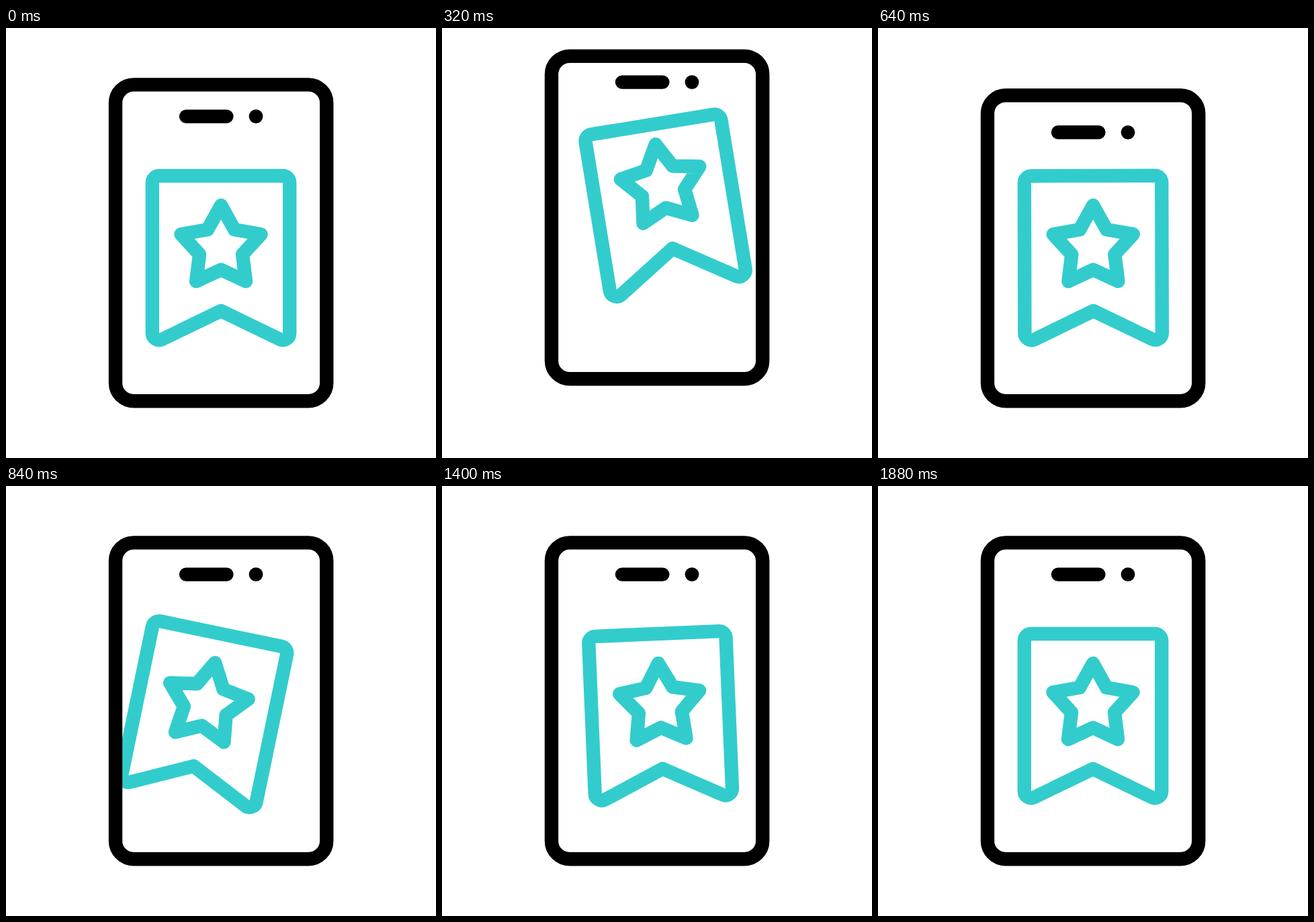
Write an HTML page that moves like this. It is 640 px wide and 640 px high and loops after 2 s.

```html
<!DOCTYPE html>
<html lang="en">
<head>
<meta charset="utf-8">
<title>Bookmark on a phone</title>
<style>
  html, body { margin: 0; width: 100%; height: 100%; overflow: hidden; background: #fff; }
  svg { display: block; width: 100vw; height: 100vh; }
  .line { fill: none; stroke-width: 20.4; stroke-linecap: round; stroke-linejoin: round; }
</style>
</head>
<body>
<svg viewBox="0 0 640 640">
  <g id="jump">
    <g id="swing" class="line" stroke="#33cccc">
      <path id="ribbon"/>
      <path id="star" d="M320 264 L340 300 L379.5 307 L352 337 L357 377 L320 359.7
        L283 377 L288 337 L260.5 307 L300 300 Z"/>
    </g>
    <rect id="body" class="line" stroke="#000" x="163" width="314.2" rx="27"/>
    <g id="speaker">
      <path class="line" stroke="#000" d="M268 131.6 H328.4"/>
      <circle cx="372" cy="131.6" r="10.4"/>
    </g>
  </g>
</svg>
<script>
const LOOP = 2000, STEP = 40;
const BODY_TOP = 84.4, BODY_BOTTOM = 555.2;
const $ = id => document.getElementById(id);

// Each track: [time in ms, value], eased between neighbours.
const tracks = {
  lift:    [[80, 0], [320, -33], [560, 0]],
  top:     [[80, 0], [320, -9.5], [560, 28], [735, 0]],
  speaker: [[80, 0], [320, -18], [560, 42], [735, 0]],
  ribbon:  [[80, 0], [320, -44], [560, 0]],
  star:    [[80, 0], [320, -58], [560, 0]],
  angle:   [[50, 0], [440, -12], [840, 11.7], [1312, -3.1], [1680, 1.7], [1880, 0]]
};

const ease = x => x * x * (3 - 2 * x);

function valueAt(keys, t) {
  if (t <= keys[0][0]) return keys[0][1];
  for (let i = 1; i < keys.length; i++) {
    const [t0, a] = keys[i - 1], [t1, b] = keys[i];
    if (t < t1) return a + (b - a) * ease((t - t0) / (t1 - t0));
  }
  return keys[keys.length - 1][1];
}

// Flag outline with rounded corners; its lower edges stay tangent to the corners.
function ribbonPath(corner, notch) {
  const r = 10.2, left = 228, right = 412;
  const head = 230.2 + corner, foot = 454.2 + corner, tip = 421 + notch;
  const dx = 320 - left, dy = tip - foot;
  const slope = Math.atan2(dy, dx) - Math.asin(r / Math.hypot(dx, dy));
  const sx = -r * Math.sin(slope), sy = foot + r * Math.cos(slope);
  const arc = (x, y) => `A${r} ${r} 0 0 1 ${x} ${y}`;
  return `M${left} ${head - r} H${right} ${arc(right + r, head)} V${foot}
    ${arc(right - sx, sy)} L320 ${tip} L${left + sx} ${sy}
    ${arc(left - r, foot)} V${head} ${arc(left, head - r)} Z`;
}

const move = (id, y) => $(id).setAttribute("transform", `translate(0 ${y})`);

function draw(t) {
  const v = {};
  for (const name in tracks) v[name] = valueAt(tracks[name], t);
  move("jump", v.lift);
  move("speaker", v.speaker);
  move("star", v.star);
  $("swing").setAttribute("transform", `rotate(${v.angle} 320 220)`);
  $("ribbon").setAttribute("d", ribbonPath(v.ribbon, v.star));
  $("body").setAttribute("y", BODY_TOP + v.top);
  $("body").setAttribute("height", BODY_BOTTOM - BODY_TOP - v.top);
}

const start = performance.now();
function tick() {
  const t = (performance.now() - start) % LOOP;
  draw(Math.floor(t / STEP) * STEP);
  requestAnimationFrame(tick);
}
tick();
</script>
</body>
</html>
```
